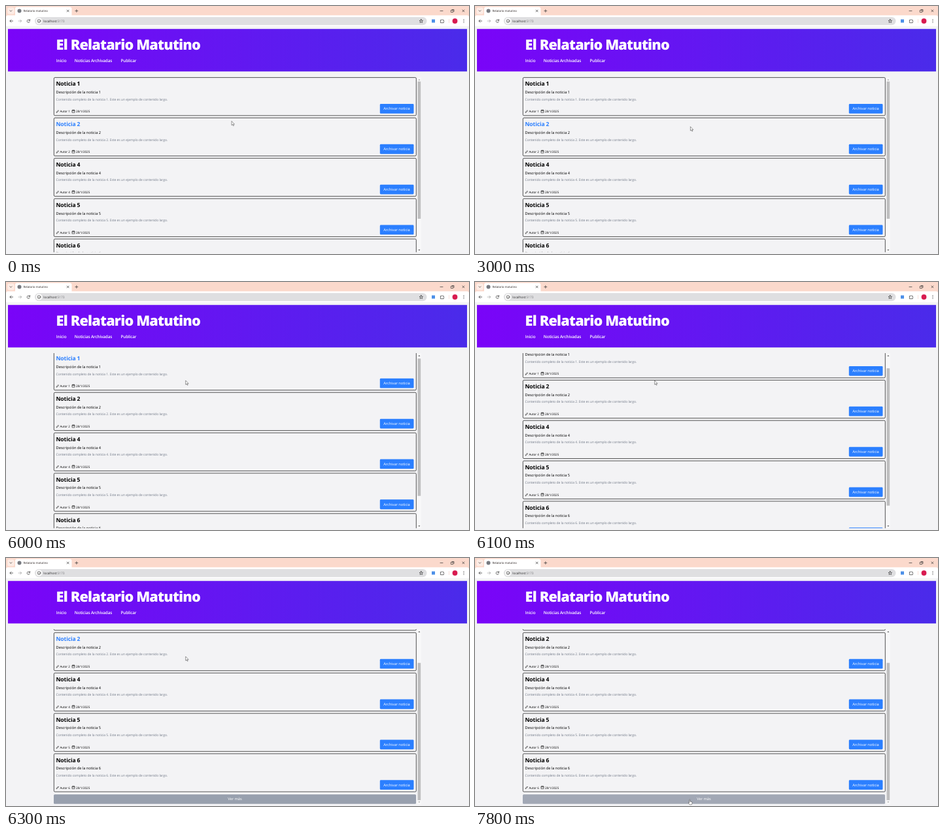
An HTML page that plays this animation: 708x380 px, repeating every 8 s.

```html
<!DOCTYPE html>
<html lang="es">
<head>
<meta charset="utf-8">
<title>Relatario matutino</title>
<style>
  html, body { margin: 0; width: 100%; height: 100%; overflow: hidden; background: #f3f3f5; }
  svg { display: block; width: 708px; height: 380px; }
  text { font-family: "Open Sans", "Noto Sans", sans-serif; letter-spacing: -.01em; text-rendering: geometricPrecision; }
  .h1 { font-size: 21.7px; font-weight: 800; letter-spacing: -.038em; fill: #fff; }
  .nav { font-size: 6.4px; font-weight: 600; letter-spacing: -.025em; fill: #fff; }
  .title { font-size: 8.6px; font-weight: 700; letter-spacing: -.015em; }
  .desc { font-size: 5.75px; }
  .body { font-size: 5.03px; fill: #737b89; }
  .meta { font-size: 4.6px; }
  .btn { font-size: 5.75px; fill: #fff; text-anchor: middle; }
  .tab { font-size: 4.4px; fill: #2a2220; }
  .url { font-size: 4.9px; fill: #2a2a2c; }
  .line { fill: none; stroke: #333; stroke-width: .7; stroke-linecap: round; stroke-linejoin: round; }
  .pointer { fill: #fff; stroke: #333; stroke-width: .5; stroke-linejoin: round; }
</style>
</head>
<body>
<svg viewBox="0 0 708 380">
  <defs>
    <linearGradient id="violet"><stop stop-color="#7a04f8"/><stop offset="1" stop-color="#4a2bea"/></linearGradient>
    <clipPath id="view"><rect x="70" y="109" width="560" height="268.3"/></clipPath>
    <path id="pencil" class="line" d="M.5 4 1 2.8 3.2 .6 4 1.4 1.800 3.600Z"/>
    <path id="calendar" class="line" d="M.4 .8H4V4.400H.4ZM.4 1.700H4M1.300 .1V.8M3.100 .1V.8"/>
    <path id="back" class="line" d="M2.300 0H-2.300M-.3-2-2.300 0-.3 2"/>
    <path id="plus" class="line" d="M-2 0H2M0-2V2"/>
  </defs>

  <!-- tab strip -->
  <rect width="708" height="18" fill="#fbd9cc"/>
  <rect x="2.300" y="2.300" width="10.400" height="10.200" rx="3" fill="#fdece5"/>
  <path class="line" d="M5.900 6.800l1.500 1.500 1.500-1.500"/>
  <rect x="14" y="1.500" width="86.500" height="16" rx="3" fill="#fff"/>
  <circle cx="20.500" cy="7.500" r="3" fill="#777a80"/>
  <text class="tab" x="26.500" y="9.100">Relatario matutino</text>
  <use href="#plus" transform="translate(94.700 7.500) rotate(45)"/>
  <use href="#plus" x="107.900" y="7.500"/>
  <path class="line" d="M664 7.500h4"/>
  <path class="line" d="M682 5.500h3v3M680.700 6.500h3v3h-3Z"/>
  <use href="#plus" transform="translate(699.400 7.400) rotate(45)"/>

  <!-- toolbar -->
  <rect y="14.300" width="708" height="18" rx="3" fill="#fff"/>
  <rect x="44" y="16.900" width="599.500" height="12.400" rx="6.200" fill="#dfdfe1"/>
  <use href="#back" x="8.300" y="23"/>
  <use href="#back" transform="translate(21.300 23) scale(-1 1)" opacity=".45"/>
  <path class="line" d="M36.300 22a2.200 2.200 0 1 0 .1 2M36.600 20.500v1.700h-1.700"/>
  <circle cx="50.500" cy="23" r="4.700" fill="#fff"/>
  <circle class="line" cx="50.500" cy="23" r="2.400"/>
  <path class="line" d="M50.500 22.900v1.200"/>
  <text class="url" x="57.300" y="24.800">localhost<tspan fill="#77777b">:5173</tspan></text>
  <polygon id="star" class="line"/>
  <rect x="651" y="20.500" width="5" height="5" fill="#4b8fe8"/>
  <path class="line" d="M664.800 21.500h1.300q.9-2 1.800 0h1.300v1.300q1.800 .8 0 1.600v1.300h-4.400Z"/>
  <path d="M677.500 20v6" stroke="#f5d5ca" stroke-width=".7"/>
  <circle cx="686.500" cy="23" r="3.900" fill="#d81b50"/>
  <path d="M700 20.900v4.300" stroke="#333" stroke-width="1.200" stroke-linecap="round" stroke-dasharray="0 2.100"/>

  <!-- page -->
  <rect y="31.200" width="708" height="349" fill="#f3f3f5"/>
  <rect x="3" y="35.200" width="702" height="65.100" fill="url(#violet)"/>
  <text class="h1" x="76.600" y="67.400">El Relatario Matutino</text>
  <text class="nav" x="76.800" y="85.500">Inicio</text>
  <text class="nav" x="104.800" y="85.500">Noticias Archivadas</text>
  <text class="nav" x="175.500" y="85.500">Publicar</text>

  <g clip-path="url(#view)"><g id="list"></g></g>

  <rect x="629" y="109.400" width="5.800" height="268" fill="#f8f8f9"/>
  <rect id="thumb" x="629.500" width="4.700" height="210.400" fill="#bebebf"/>
  <path id="up" d="M630.400 113.800l1.500-1.800 1.500 1.800Z"/>
  <path id="down" d="M630.400 373.200l1.500 1.800 1.500-1.800Z"/>

  <path id="arrow" class="pointer" d="M0 0V6.300L1.500 5 2.500 7.300 3.500 6.800 2.500 4.700H4.400Z"/>
  <path id="hand" class="pointer" d="M-.6 .5Q0-.4 .6 .5V3L3.700 4V5.700L2.900 7.900H-.3L-2.200 5Q-2.200 4-.6 5Z"/>
</svg>
<script>
const LOOP = 8000, STEP = 100;
const TOP = 109.6, PITCH = 61.85, CARD_H = 58.7, MORE_Y = 419.3, MAX_SCROLL = 57.1;
const BLUE = "#2b7fff";
const $ = id => document.getElementById(id);

// eased progress from time a to time b
function ease(t, a, b) {
  const p = Math.min(1, Math.max(0, (t - a) / (b - a)));
  return p * p * (3 - 2 * p);
}

const home = { x: 345, y: 176.4 };
const moves = [
  { from: 0, to: 200, x: 346, y: 183.3 },
  { from: 300, to: 600, x: 329.4, y: 184.8 },
  { from: 3800, to: 4000, x: 319, y: 183.4 },
  { from: 4500, to: 4800, x: 310, y: 183 },
  { from: 4800, to: 5300, x: 322.5, y: 182.8 },
  { from: 5400, to: 6000, x: 274.7, y: 150.9 },
  { from: 6300, to: 7300, x: 328.4, y: 370 }
];
const pointerAt = t => moves.reduce((p, m) => {
  const k = ease(t, m.from, m.to);
  return { x: p.x + (m.x - p.x) * k, y: p.y + (m.y - p.y) * k };
}, home);
const scrollAt = t => MAX_SCROLL * ease(t, 5960, 6300);

const card = (n, i) => `<g transform="translate(0 ${TOP + i * PITCH})">
  <rect x="73.300" y="0" width="554" height="58.300" rx="1.600" fill="none" stroke="#111" stroke-width=".7"/>
  <text class="title" x="76.500" y="12.700">Noticia ${n}</text>
  <text class="desc" x="76.600" y="24.400">Descripción de la noticia ${n}</text>
  <text class="body" x="76.600" y="35.100">Contenido completo de la noticia ${n}. Este es un ejemplo de contenido largo.</text>
  <use href="#pencil" x="76.700" y="49.500"/>
  <text class="meta" x="82.400" y="53.900">Autor ${n}</text>
  <use href="#calendar" x="101" y="49.300"/>
  <text class="meta" x="106.900" y="53.900">28/1/2025</text>
  <rect x="571.800" y="40.400" width="51.700" height="14.800" rx="1.400" fill="${BLUE}"/>
  <text class="btn" x="597.500" y="49.900">Archivar noticia</text>
</g>`;

$("list").innerHTML = [1, 2, 4, 5, 6].map(card).join("") +
  `<rect id="more" x="73" y="${MORE_Y}" width="554" height="14.600" rx="1.500"/>
   <text class="btn" x="350" y="${MORE_Y + 9.3}">Ver más</text>`;
const titles = [...document.querySelectorAll(".title")];

$("star").setAttribute("points", Array.from({ length: 10 }, (_, i) => {
  const r = i % 2 ? 1.3 : 2.9, a = i * Math.PI / 5;
  return [634.8 + r * Math.sin(a), 23.2 - r * Math.cos(a)];
}).join(" "));

// hovering follows the pointer one step late
function hovered(t) {
  const y = pointerAt(t - STEP).y + scrollAt(t - STEP);
  if (y >= MORE_Y) return "more";
  const i = Math.floor((y - TOP) / PITCH);
  return y - TOP - i * PITCH <= CARD_H ? i : -1;
}

function draw(t) {
  const scroll = scrollAt(t), over = hovered(t), { x, y } = pointerAt(t);
  $("list").setAttribute("transform", `translate(0 ${-scroll})`);
  $("thumb").setAttribute("y", 115.6 + scroll * .79);
  $("up").setAttribute("fill", scroll > 0 ? "#505050" : "#a3a3a3");
  $("down").setAttribute("fill", scroll < MAX_SCROLL ? "#505050" : "#a3a3a3");
  titles.forEach((el, i) => el.setAttribute("fill", i === over ? BLUE : "#000"));

  const onMore = over === "more";
  $("more").setAttribute("fill", onMore ? "#a2a8b5" : "#98a0ae");
  for (const id of ["arrow", "hand"]) {
    $(id).setAttribute("transform", `translate(${x} ${y})`);
    $(id).style.display = (id === "hand") === onMore ? "" : "none";
  }
}

const start = performance.now();
function tick() {
  const t = (performance.now() - start) % LOOP;
  draw(Math.floor(t / STEP) * STEP);
  requestAnimationFrame(tick);
}
tick();
</script>
</body>
</html>
```
